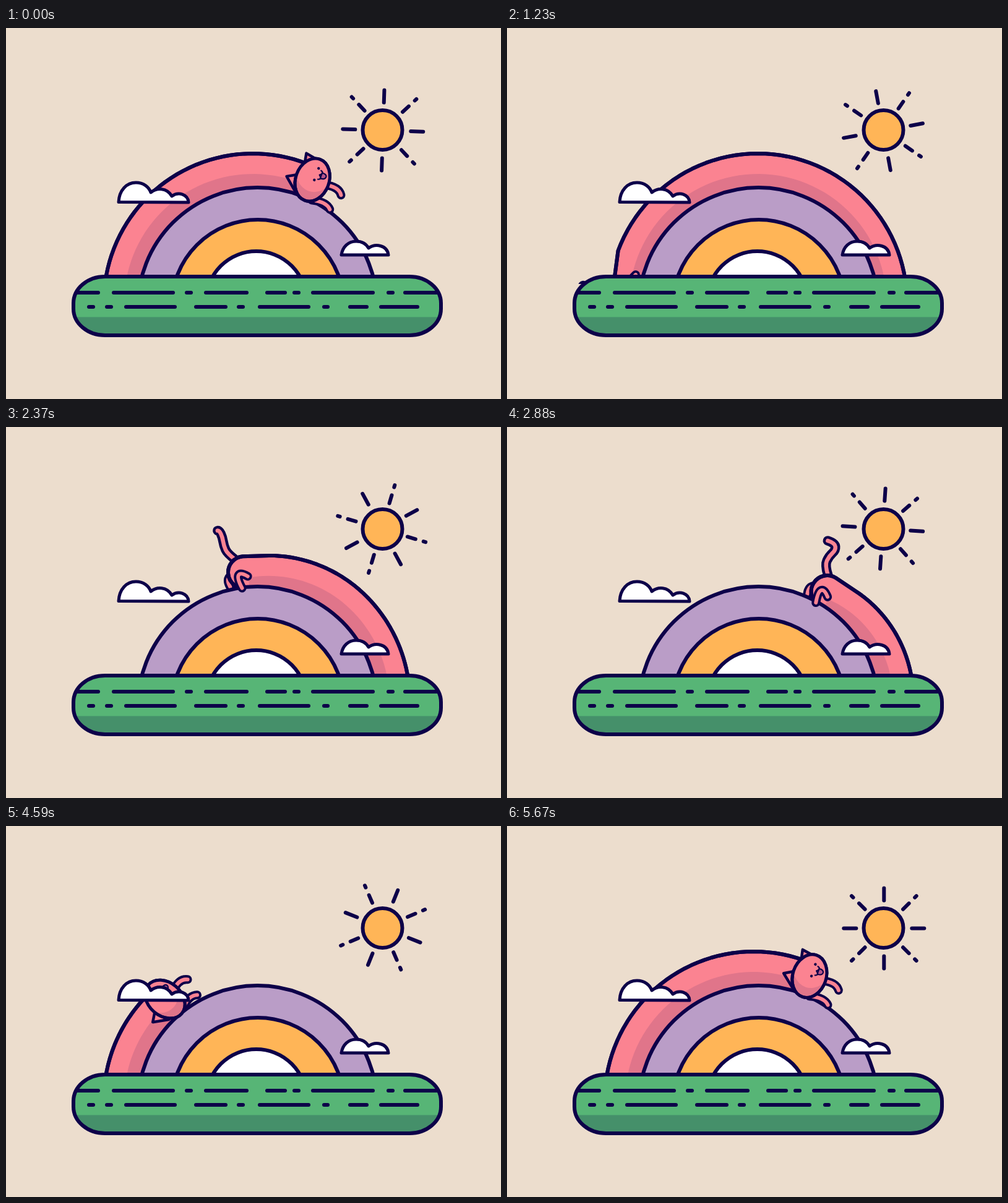
Animation, 800 px wide and 600 px high, one loop 5700 ms. Source, as an HTML page with a canvas:

```html
<!DOCTYPE html>
<html lang="en">
<head>
<meta charset="utf-8">
<title>Rainbow cat</title>
<style>
  html, body { margin: 0; width: 100%; height: 100%; overflow: hidden; background: #ecddcd; }
  canvas { display: block; width: 800px; height: 600px; }
</style>
</head>
<body>
<canvas id="stage" width="800" height="600"></canvas>
<script>
const ctx = document.getElementById('stage').getContext('2d');
const LOOP = 5700, STEP = 30, RAD = Math.PI / 180, TAU = Math.PI * 2;
const NAVY = '#0d0049', PINK = '#fb8391', ROSE = '#e0758a', SAND = '#ecddcd',
      LILAC = '#ba9dc7', GOLD = '#ffb557', GREEN = '#57b576', PINE = '#45906a';

// Motion tables: [time, value]
const HEAD_ANGLE = [[3600, -102.9], [3930, -82.9], [4590, -42.9], [5700, 26.8], [9300, 254]];
const HEAD_RADIUS = [[3930, 219], [4590, 210], [5700, 211]];
const REACH = [[3930, -9], [4590, -4], [5700, 0]];
const REAR_ANGLE = [[0, -146], [1230, -78.6], [1830, -45.8], [2880, 32.1], [3600, 85.5]];
const BODY_X = [[0, 399], [1230, 405.5], [1830, 407.5], [2880, 416], [3600, 417], [3900, 399], [4590, 399], [5050, 395], [5700, 399]];
const TAPER = [[1830, 0], [2880, 13]];
const CURL = [[1830, 0], [2880, 1], [3600, 0.4]];

const TAIL_A = [[-12, -21], [-22, -32], [-29, -41], [-35, -56], [-36, -70], [-29, -73]];
const TAIL_B = [[-13, -23], [-26, -34], [-28, -50], [-24, -64], [-31, -73], [-43, -70]];

const ROWS = [
  [428, [[109, 149], [174, 270], [292, 299], [323, 389], [422, 451], [466, 473], [496, 593], [618, 625], [645, 703]]],
  [451, [[134, 141], [163, 170], [194, 273], [307, 355], [376, 383], [410, 489], [514, 520], [556, 583], [606, 665]]]
];
const CLOUDS = [
  'M182 281.500C183 262 195 250 210 250C222 250 231 257 234 266C244 258 260 258 268 272C279 264 294 269 295 282Z',
  'M542 367C544 354 553 345 566 345C575 345 582 349 586 356C597 348 616 351 618 367Z'
].map(d => new Path2D(d));

function track(keys, t) {
  if (t <= keys[0][0]) return keys[0][1];
  for (let i = 1; i < keys.length; i++) {
    const [t0, a] = keys[i - 1], [t1, b] = keys[i];
    if (t <= t1) return a + (b - a) * (t - t0) / (t1 - t0);
  }
  return keys[keys.length - 1][1];
}

// Angles are in degrees clockwise from straight up
const polar = (x, y, r, deg) => [x + r * Math.sin(deg * RAD), y - r * Math.cos(deg * RAD)];

function paint(fill, width, path) {
  ctx.lineWidth = width;
  ctx.strokeStyle = NAVY;
  ctx.fillStyle = fill;
  if (path) { ctx.fill(path); ctx.stroke(path); } else { ctx.fill(); ctx.stroke(); }
}

function disc(x, y, r, fill) {
  ctx.beginPath();
  ctx.arc(x, y, r, 0, TAU);
  paint(fill, 6);
}

function line(x0, y0, x1, y1) {
  ctx.beginPath();
  ctx.moveTo(x0, y0);
  ctx.lineTo(x1, y1);
  ctx.stroke();
}

// Smooth limb through points: dark tube with a pink core
function tube(pts, outer, inner) {
  ctx.beginPath();
  ctx.moveTo(...pts[0]);
  for (let i = 1; i < pts.length - 1; i++) {
    const [x, y] = pts[i], [nx, ny] = pts[i + 1];
    const last = i === pts.length - 2;
    ctx.quadraticCurveTo(x, y, last ? nx : (x + nx) / 2, last ? ny : (y + ny) / 2);
  }
  ctx.strokeStyle = NAVY;
  ctx.lineWidth = outer;
  ctx.stroke();
  ctx.strokeStyle = PINK;
  ctx.lineWidth = inner;
  ctx.stroke();
}

function local(x, y, deg, draw) {
  ctx.save();
  ctx.translate(x, y);
  ctx.rotate(deg * RAD);
  draw();
  ctx.restore();
}

function pose(t) {
  const th = t < 3600 ? t + LOOP : t;
  const headDeg = track(HEAD_ANGLE, th);
  const rearDeg = t < 3600 ? track(REAR_ANGLE, t) : -150;
  return {
    t, headDeg, rearDeg,
    head: polar(400, 434, track(HEAD_RADIUS, th), headDeg),
    rear: polar(406, 444, 210, rearDeg),
    reach: track(REACH, th)
  };
}

function drawBody(p) {
  const cx = track(BODY_X, p.t), cy = 444, taper = track(TAPER, p.t);
  const from = p.rearDeg, to = Math.min(p.headDeg, 130);
  const [rx, ry] = p.rear;
  const radius = deg => {
    const s = Math.min(1, Math.max(0, (deg - from) / 50));
    return 241 - taper * (1 - s) * (1 - s);
  };
  const arcPoints = (start, inset) => {
    for (let i = 0; i <= 60; i++) {
      const deg = start + (to - start) * i / 60;
      ctx.lineTo(...polar(cx, cy, radius(deg) - inset, deg));
    }
  };
  if (to - from < 8) return;
  const psi = (from - 90) * RAD;
  ctx.beginPath();
  ctx.arc(rx, ry, 26, psi - Math.PI, psi);
  arcPoints(Math.min(from + 9, to), 0);
  ctx.arc(cx, cy, 180, (to - 90) * RAD, psi, true);
  ctx.closePath();
  paint(PINK, 6);

  ctx.save();
  ctx.clip();
  ctx.beginPath();
  ctx.moveTo(cx, cy);
  arcPoints(from, 33);
  ctx.closePath();
  ctx.fillStyle = ROSE;
  ctx.fill();
  ctx.restore();

  // Restore the rim after shading
  ctx.beginPath();
  ctx.arc(rx, ry, 26, psi - Math.PI, psi);
  arcPoints(Math.min(from + 9, to), 0);
  ctx.stroke();
}

function drawRearBack(p) {
  const w = track(CURL, p.t);
  const tail = TAIL_A.map(([x, y], i) => [x + (TAIL_B[i][0] - x) * w, y + (TAIL_B[i][1] - y) * w]);
  local(...p.rear, p.rearDeg, () => {
    tube(tail, 15.5, 6.5);
    tube([[-22, 3], [-31, 8], [-25, 21]], 14, 6);
  });
}

function drawRearFront(p) {
  local(...p.rear, p.rearDeg, () => tube([[5, 7], [-6, -1], [-13, 8], [-6, 25]], 14, 6));
}

function ear(pts) {
  ctx.beginPath();
  pts.forEach(q => ctx.lineTo(...q));
  ctx.closePath();
  paint(PINK, 4.5);
}

function drawHead(p) {
  const r = p.reach;
  local(...p.head, p.headDeg - 6.5, () => {
    tube([[20, 1], [44 + r, -5], [52 + r, 7]], 14, 6);
    tube([[10, 31], [34 + r, 25], [43 + r, 35]], 14, 6);
    ear([[-7, -34], [-24, -37], [-21, -21]]);
    ear([[-25, 0], [-41, 9], [-21, 26]]);

    ctx.beginPath();
    ctx.ellipse(0, 0, 27, 35.5, 0, 0, TAU);
    paint(ROSE, 5);
    ctx.save();
    ctx.clip();
    ctx.beginPath();
    ctx.ellipse(0, -17, 31, 36, 0, 0, TAU);
    ctx.fillStyle = PINK;
    ctx.fill();
    ctx.restore();
    ctx.beginPath();
    ctx.ellipse(0, 0, 27, 35.5, 0, 0, TAU);
    ctx.stroke();

    ctx.fillStyle = NAVY;
    for (const y of [-21, -1]) {
      ctx.beginPath();
      ctx.arc(3, y, 2.2, 0, TAU);
      ctx.fill();
    }
    ctx.beginPath();
    ctx.moveTo(11, -16);
    ctx.bezierCurveTo(22, -18, 22, -6, 11, -7);
    ctx.closePath();
    paint('#b6558a', 2.2);
    ctx.beginPath();
    ctx.moveTo(8, -19);
    ctx.quadraticCurveTo(15, -17, 8, -11.5);
    ctx.quadraticCurveTo(15, -6, 8, -4);
    ctx.stroke();
  });
}

function drawGround() {
  const shape = new Path2D();
  shape.roundRect(109, 402, 594, 95, [{ x: 51, y: 43 }]);
  ctx.fillStyle = GREEN;
  ctx.fill(shape);
  ctx.save();
  ctx.clip(shape);
  ctx.fillStyle = PINE;
  ctx.fillRect(100, 467.5, 620, 40);
  ctx.strokeStyle = NAVY;
  ctx.lineWidth = 6;
  for (const [y, parts] of ROWS) for (const [a, b] of parts) line(a, y, b, y);
  ctx.restore();
  ctx.stroke(shape);
}

function drawSun(t) {
  disc(608.5, 165, 32, GOLD);
  local(608.3, 165, (t + STEP) / LOOP * 360, () => {
    ctx.translate(1, 0.5);
    for (let i = 0; i < 8; i++) {
      if (i % 2) {
        line(0, -43.5, 0, -57);
        line(0, -70.5, 0, -74);
      } else {
        line(0, -45, 0, -65);
      }
      ctx.rotate(Math.PI / 4);
    }
  });
}

function render(t) {
  const p = pose(t);
  ctx.lineCap = ctx.lineJoin = 'round';
  ctx.fillStyle = SAND;
  ctx.fillRect(0, 0, 800, 600);

  ctx.save();
  ctx.beginPath();
  ctx.rect(0, 0, 800, 414);
  ctx.clip();
  drawRearBack(p);
  drawBody(p);
  disc(406.5, 451.5, 193.4, LILAC);
  disc(407, 449.3, 139.3, GOLD);
  disc(404.5, 442, 81, '#fff');
  drawHead(p);
  drawRearFront(p);
  ctx.restore();

  drawGround();
  for (const c of CLOUDS) paint('#fff', 5, c);
  drawSun(t);
}

function frame() {
  const t = performance.now() % LOOP;
  render(Math.floor(t / STEP) * STEP);
  requestAnimationFrame(frame);
}
frame();
</script>
</body>
</html>
```
